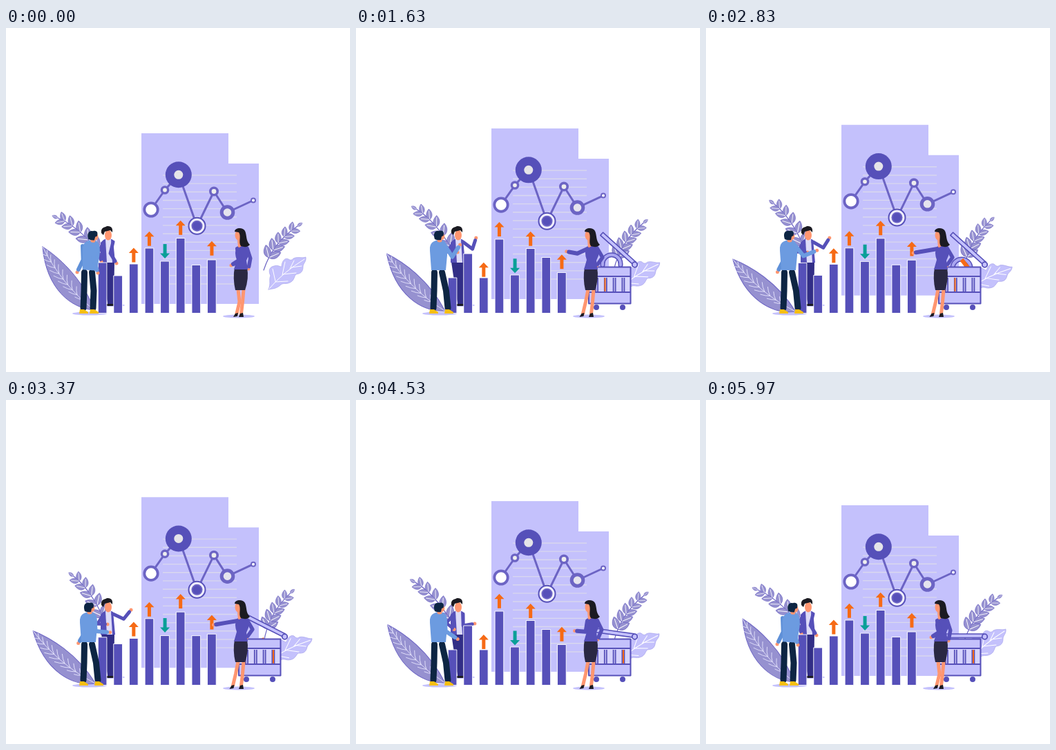
Animation, 498 px wide and 500 px high, one loop 6010 ms. Source, as an HTML page:

```html
<!DOCTYPE html>
<html lang="en">
<head>
<meta charset="utf-8">
<title>Team analytics</title>
<style>
html, body { margin: 0; width: 100%; height: 100%; overflow: hidden; background: #fff; }
svg { display: block; width: 100vw; height: 100vh; }
</style>
</head>
<body>
<svg id="stage" viewBox="0 0 498 500" fill="none" stroke-linecap="round" stroke-linejoin="round"></svg>
<script>
const LOOP = 6010;
const PURPLE = '#5650b9', MID = '#6c64c4', LILAC = '#c4c1fc', SKIN = '#ff9670', BLUE = '#6c9be0',
      NAVY = '#0d2543', INDIGO = '#322e86', ORANGE = '#f66a15', TEAL = '#0a9f98', BLACK = '#1b1b22', LEAF = '#9691d0';
const stage = document.getElementById('stage');
const set = (id, attrs) => { for (const k in attrs) document.getElementById(id).setAttribute(k, attrs[k]); };
const range = n => [...Array(n).keys()];
const mix = (a, b, u) => a + (b - a) * u;
const ease = u => (1 - Math.cos(Math.PI * Math.min(1, Math.max(0, u)))) / 2;
const wave = u => (1 - Math.cos(2 * Math.PI * u)) / 2;
const hump = u => Math.sin(Math.PI * Math.min(1, Math.max(0, u)));

const path = (d, fill, extra = '') => `<path d="${d}" fill="${fill}" ${extra}/>`;
const line = (d, color, width, extra = '') => `<path d="${d}" stroke="${color}" stroke-width="${width}" ${extra}/>`;
const circle = (x, y, r, fill, stroke = 'none', w = 0, extra = '') =>
  `<circle cx="${x}" cy="${y}" r="${r}" fill="${fill}" stroke="${stroke}" stroke-width="${w}" ${extra}/>`;
const ellipse = (x, y, rx, ry, fill) => `<ellipse cx="${x}" cy="${y}" rx="${rx}" ry="${ry}" fill="${fill}"/>`;
const group = (id, content) => `<g id="${id}">${content}</g>`;
const limb = (id, color, w) => circle(0, 0, 2.5, SKIN, 'none', 0, `id="${id}Hand"`) + line('', color, w, `id="${id}"`);

// Paired leaves along a quadratic stem running from tip to base.
function sprig(tip, bend, base, size) {
  const at = (u, i) => (1 - u) ** 2 * tip[i] + 2 * u * (1 - u) * bend[i] + u * u * base[i];
  const blade = (x, y, angle, s) =>
    `<g transform="translate(${x} ${y}) rotate(${angle}) scale(${s})">` +
    path('M0 0C3 -6 10 -6 16 0C10 6 3 5 0 0', LEAF, `stroke="${MID}" stroke-width=".6"`) +
    line('M1 0L13 0', '#fff', .8) + '</g>';
  const angle = (dx, dy) => Math.atan2(dy, dx) * 180 / Math.PI;
  let out = line(`M${tip}Q${bend} ${base}`, MID, 1.2);
  for (const i of range(5)) {
    const u = .14 + i * .155, x = at(u, 0), y = at(u, 1);
    const heading = angle(x - at(u + .03, 0), y - at(u + .03, 1));
    const s = size * (.8 + .08 * i);
    out += blade(x, y, heading + 40, s) + blade(x, y, heading - 40, s);
  }
  return out + blade(...tip, angle(tip[0] - bend[0], tip[1] - bend[1]), size * .5);
}

function bigLeaf() {
  const veins = range(9).map(i => {
    const u = .12 + i * .085, bow = u * (1 - u), s = .25 + 3 * bow;
    const x = 53 + 75 * u - 18 * bow, y = 318 + 92 * u + 20 * bow;
    return `M${x} ${y}q${-2 * s} ${-7 * s} ${-s} ${-14 * s}M${x} ${y}q${-7 * s} ${-s} ${-14 * s} ${-5 * s}`;
  }).join('');
  return path('M53 318C75 332 110 362 128 410C95 408 58 380 53 318Z', LEAF, `stroke="${MID}" stroke-width="1"`) +
    line('M53 318Q81 374 128 410' + veins, '#e4e2fb', .9);
}

const lobedLeaf =
  path('M380 380C384 371 380 366 383 360C379 352 382 347 388 346C393 344 396 347 399 347C399 339 404 333 409 336' +
    'Q413 339 416 335C422 332 428 335 434 333C435 340 430 342 430 347C430 354 427 357 420 358' +
    'C417 360 418 367 411 370C405 373 402 370 398 373C392 379 386 379 380 380Z', LILAC, 'stroke="#aaa6ec" stroke-width=".7"') +
  line('M381 379Q401 355 432 336M390 368L386 350M400 359L404 340M411 350L417 338M390 369L408 368M401 358L420 356M413 348L428 346', '#fff', 1);

const paper =
  path('M196 153H322V197H366V401H196Z', LILAC) +
  line(range(14).map(i => `M227 ${214 + i * 12.15}H334`).join(''), '#d9d8ee', 1.4, 'stroke-linecap="butt"') +
  line('M210 264L230 235.5L250 213L276.5 288L301 237.5L320.5 268L358 250.5', MID, 3) +
  circle(210, 264, 9.7, '#fff', MID, 3.8) +
  circle(230, 235.5, 4.6, '#eee', MID, 3.4) +
  circle(249.8, 213.3, 19, PURPLE) + circle(249.8, 213.3, 6.5, '#e5e4e8') +
  circle(276.5, 287.7, 12, '#f0effc', PURPLE, 2) + circle(276.5, 287.7, 8, MID) + circle(276.5, 287.7, 6.2, PURPLE) +
  circle(301, 237.5, 5.2, '#eee', MID, 3.6) +
  circle(320.5, 268, 8.3, '#e5e4ee', MID, 5) +
  circle(358, 250.5, 3, '#fff', MID, 2);

// Bar: resting top and travel. Arrows follow the bar they hover over.
const bars = [[341, 22], [360, -32], [343, 20], [320, -13], [339, 20], [305.5, 15], [344.5, -11], [337, 18.5]];
const arrowBars = [2, 3, 4, 5, 7];
const FALLING = 4;
const barX = i => 133.5 + i * 22.62;

const handle = 'M357 0V-2A13 13 0 0 1 383 -2V0';
const cart =
  group('ring', line(handle, PURPLE, 7) + line(handle, '#aaa6f0', 4)) +
  path('M-3 -8H3V8H-3Z', ORANGE, 'id="stick"') +
  group('lid', `<rect x="338" y="340" width="64" height="5.5" fill="${LILAC}" stroke="${PURPLE}" stroke-width="1.6"/>`) +
  circle(348, 406, 4, PURPLE) + circle(386, 406, 4, PURPLE) +
  `<rect x="337" y="347.5" width="60.5" height="53" fill="${LILAC}" stroke="${PURPLE}" stroke-width="2"/>` +
  '<rect x="339" y="362" width="57" height="21" fill="#d5d3fc"/>' +
  line('M338 361H397M338 384H397', PURPLE, 1.8) +
  line(range(4).map(i => `M${350 + i * 12.8} 363V383m-3 0V363`).join(''), PURPLE, 1.8, 'stroke-linecap="butt"') +
  line('M0 364V382', ORANGE, 2, 'id="insert"') +
  circle(403.5, 344, 3.8, LILAC, PURPLE, 1.8);

const backMan =
  path('M138 340H148L153 401H147Z', INDIGO) + path('M146 340H157L156 401H151Z', INDIGO) +
  path('M146 401H156V404H145Z', BLACK) +
  path('M141 308Q148 304 155 308L158 341H137L137 312Z', PURPLE) +
  path('M144 307H152L154 341H146Z', '#dedcf8') +
  ellipse(148, 301, 5, 7.5, SKIN) +
  path('M138 298C137 289 143 290 146 288C151 288 155 289 154 297L151 294L143 296L141 301Z', BLACK) +
  limb('backFar', PURPLE, 4.5) + limb('backNear', PURPLE, 5);

const frontMan =
  limb('frontFar', '#5f90d8', 6) +
  line('M113.5 355L113 382L112 407', NAVY, 9) + line('', NAVY, 9, 'id="leg"') +
  path('M107 409H113L119 413V415H106Z', '#f6bf12') +
  path('M-5 409H1L7 413V415H-6Z', '#f6bf12', 'id="shoe"') +
  group('frontBody',
    path('M113 310Q121 306 128 310Q133 316 132 330L130 352H109L107 324Q106 313 113 310Z', BLUE) +
    ellipse(121, 309, 3.5, 2.5, SKIN) + ellipse(124.5, 303, 3.8, 5, SKIN) +
    path('M114 307C111 298 115 294 120 295C126 293 128 297 126.5 302L124 303L123 308Q118 309 114 307Z', NAVY)) +
  limb('frontNear', BLUE, 6);

const woman =
  limb('womanFar', PURPLE, 5.5) +
  line('', SKIN, 5, 'id="womanLeg"') + line('M344 380L342.5 398L340.5 415', SKIN, 5) +
  path('M-2 415L2 414L1 419L-5 420Z', BLACK, 'id="heel"') + path('M339 415L343 414L344 420L337 420Z', BLACK) +
  path('M331 348H349Q352 364 346 381H332Q328 364 331 348Z', '#2a2842') +
  path('M334 318Q341 314 348 317Q353 321 351 331L348 338L350 351H330L334 337Q330 326 334 318Z', PURPLE) +
  path('M335 307H342L341 317L336 320Z', SKIN) + ellipse(336.5, 301, 5, 7.5, SKIN) +
  path('M331 296C331 290 343 289 346 295C349 302 347 309 353 315Q349 320 340 317C336 311 341 303 337 297Z', BLACK) +
  limb('womanNear', PURPLE, 6);

stage.innerHTML =
  ellipse(121, 415, 25, 2.6, LILAC) + ellipse(155, 403, 17, 2, LILAC) + ellipse(337, 419, 23, 2.6, LILAC) +
  group('paper', paper) +
  group('bigLeaf', bigLeaf()) +
  group('leftSprig', sprig([75, 276], [110, 290], [150, 345], 1.1)) +
  group('rightSprig', sprig([422, 288], [386, 312], [373, 352], 1.05)) +
  group('lobedLeaf', lobedLeaf) +
  group('cart', cart) + backMan +
  bars.map((b, i) => `<rect id="bar${i}" x="${barX(i)}" width="12.4" fill="${PURPLE}" stroke="#fff" stroke-width=".9"/>`).join('') +
  arrowBars.map(i => `<g id="arrow${i}">` + (i === FALLING
    ? path('M0 21L7 13.5H2.5V0H-2.5V13.5H-7Z', TEAL)
    : path('M0 0L7 7.5H2.5V21H-2.5V7.5H-7Z', ORANGE)) + '</g>').join('') +
  frontMan + woman;

// Two equal segments; side picks which way the elbow bends.
function reach(id, [sx, sy], [hx, hy], length, side) {
  const dx = hx - sx, dy = hy - sy, d = Math.hypot(dx, dy);
  const bow = side * Math.sqrt(Math.max(0, length ** 2 - d * d / 4)) / d;
  const ex = sx + dx / 2 - dy * bow, ey = sy + dy / 2 + dx * bow;
  set(id, { d: `M${sx} ${sy}L${ex} ${ey}L${mix(ex, hx, .78)} ${mix(ey, hy, .78)}` });
  set(id + 'Hand', { cx: hx, cy: hy });
}
const blend = (a, b, u) => a.map((v, i) => mix(v, b[i], u));

function draw(t) {
  const drift = wave(t / LOOP);
  set('paper', { transform: `translate(0 ${-12.3 * drift})` });
  const sway = (id, angle, x, y) => set(id, { transform: `rotate(${angle * drift} ${x} ${y})` });
  sway('bigLeaf', -11, 140, 402);
  sway('leftSprig', 16, 160, 350);
  sway('rightSprig', -9.5, 372, 350);
  sway('lobedLeaf', 14, 380, 378);

  const beat = t % (LOOP / 2), hop = wave(2 * t / LOOP);
  const swing = ease(beat / 1340) - ease((beat - 1640) / 1300);
  bars.forEach(([rest, travel], i) => {
    const y = rest + travel * swing;
    set('bar' + i, { y, height: 414.5 - y });
  });
  for (const i of arrowBars) {
    const y = bars[i][0] - 22 - .75 * i + bars[i][1] * 1.08 * hop;
    set('arrow' + i, { transform: `translate(${barX(i) + 6.1} ${y})` });
  }

  const away = ease(t / 800) * ease((LOOP - t) / 700);
  const open = ease(t / 700) - ease((t - 3000) / 800);
  const lift = 30 * hump((t - 500) / 3100);
  set('cart', { visibility: t < 30 ? 'hidden' : 'visible' });
  set('lid', { transform: `rotate(${8 * away + 34 * open} 403.5 344)` });
  set('ring', { transform: `translate(0 ${372 - lift})` });
  set('stick', { transform: `translate(375 ${372 - 29 * hump((t - 1900) / 1900)}) rotate(-38)` });
  set('insert', { transform: `translate(${lift > 15 ? 360.5 : 387} 0)` });

  const raise = ease(t / 800) - ease((t - 3900) / 1200);
  const pointing = [157 + 7 * Math.sin(6 * Math.PI * t / LOOP), 328 + 17 * Math.cos(2 * Math.PI * (t - 3950) / 3800)];
  reach('backNear', [155, 311], blend([160, 342], [167 + t / 240, 305], raise), 17, 1);
  reach('backFar', [140, 313], blend([138, 340], [147, 326], raise), 14.5, 1);
  reach('frontNear', [128, 315], blend([133, 356], pointing, raise), 21, 1);
  reach('frontFar', [111, 317], blend([103, 355], [115, 345], hop), 20, -1);
  reach('womanNear', [335, 321], blend([326, 345], [311 - 11 * drift, 322 + 5 * drift], raise), 16, -1);
  reach('womanFar', [349, 320], blend([351, 350], [348, 346], raise), 15.5, -1);

  const lean = 1 - away, foot = mix(127, 134, away), heel = mix(333, 327.5, away);
  set('frontBody', { transform: `translate(${1.8 * lean} 0) rotate(${4 * lean} 119 352)` });
  set('leg', { d: `M124.5 355L${(125 + foot) / 2 + 1} 382L${foot - 1} 407` });
  set('shoe', { transform: `translate(${foot} 0)` });
  set('womanLeg', { d: `M336 380L${heel + 5} 398L${heel + 1} 415` });
  set('heel', { transform: `translate(${heel + 1} 0)` });
}

const start = performance.now();
function tick() {
  draw((performance.now() - start) % LOOP);
  requestAnimationFrame(tick);
}
tick();
</script>
</body>
</html>
```
